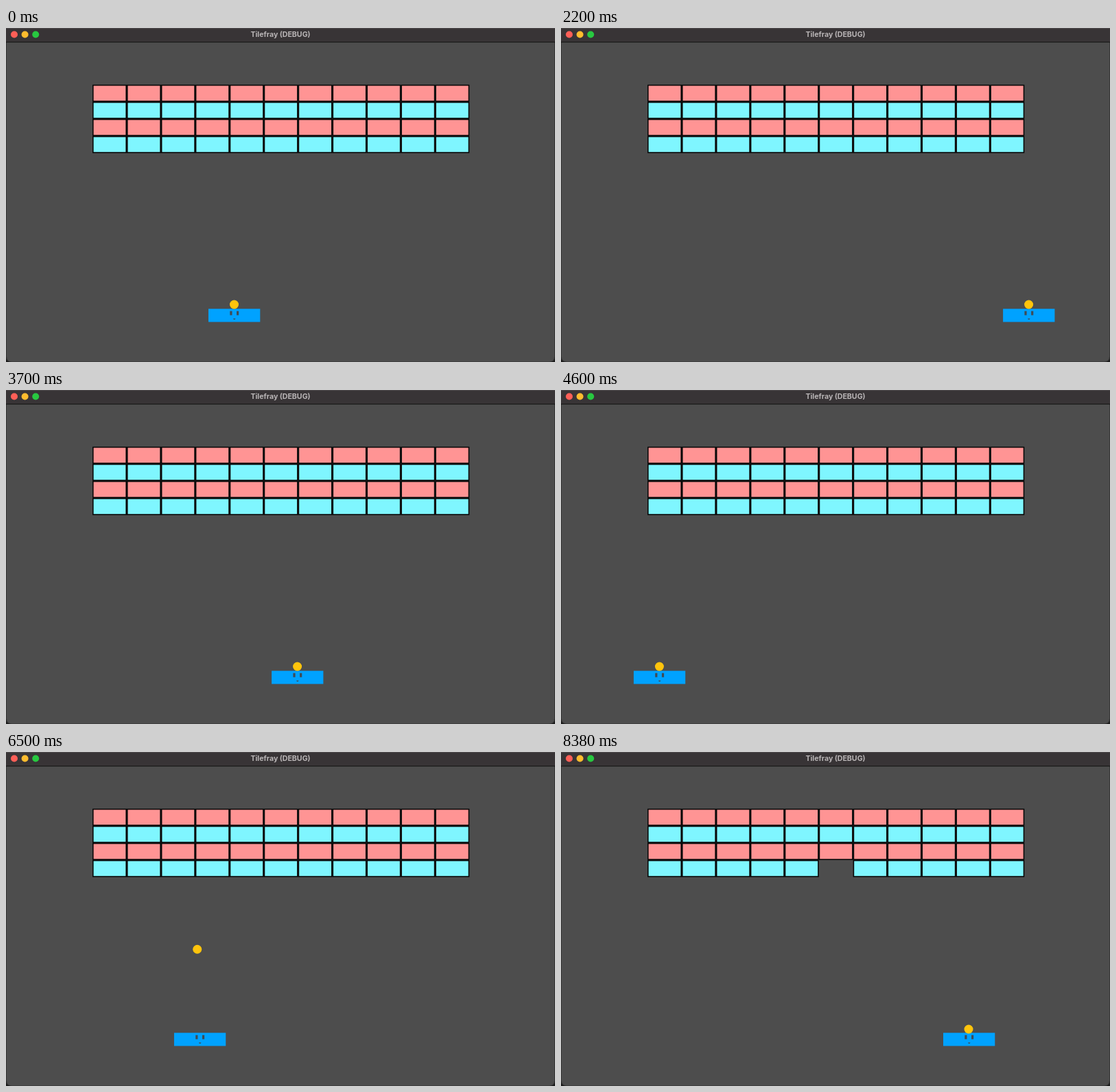
An HTML page for the animation above (8560 ms loop, 800x488 px).

```html
<!DOCTYPE html>
<html lang="en">
<head>
<meta charset="utf-8">
<title>Tilefray</title>
<style>
  html, body { margin: 0; width: 100%; height: 100%; overflow: hidden; background: #1c1c1c; }
  svg { display: block; width: 800px; height: 488px; }
  text { font: 700 10.6px Inter, "Open Sans", sans-serif; fill: #b9b5b6; }
</style>
</head>
<body>
<svg viewBox="0 0 800 488">
  <path d="M0 0H800V480Q800 488 792 488H8Q0 488 0 480Z" fill="#353535"/>
  <path d="M1 21H799V480Q799 487.5 791 487.5H9Q1 487.5 1 480Z" fill="#4d4d4d"/>
  <rect width="800" height="21" fill="#383436"/>
  <rect width="800" height="1" fill="#4c494a"/>
  <rect y="20" width="800" height="1.2" fill="#181818"/>
  <circle cx="12" cy="9.5" r="5" fill="#ff5f57"/>
  <circle cx="27.6" cy="9.5" r="5" fill="#febc2e"/>
  <circle cx="43.2" cy="9.5" r="5" fill="#28c840"/>
  <text x="400" y="13" text-anchor="middle">Tilefray (DEBUG)</text>
  <g id="bricks"></g>
  <g id="paddle">
    <rect x="-37.5" y="410.3" width="75.3" height="19.2" fill="#00a2ff"/>
    <g fill="#3f4b55">
      <rect x="-6.2" y="413.6" width="3.2" height="6"/>
      <rect x="3.5" y="413.6" width="3.2" height="6"/>
      <path d="M-1.5 424.4H2L1.2 426H-.7Z"/>
    </g>
  </g>
  <circle id="ball" r="6.5" fill="#ffc40c"/>
</svg>
<script>
const LOOP = 8560, STEP = 100, LAST_STEP = 8200, FINAL = 8380;
const LAUNCH = 5810, HIT = 7092;
const BALL_SPEED = 0.1677; // px per ms on each axis
const REST_Y = 404, HIT_X = 378, HIT_Y = 189;

// Paddle centre: [time, x], linear in between
const moves = [
  [0, 332.5], [542, 163], [2457, 762], [2620, 762], [4939, 37.5],
  [5315, 37.5], [5717, 163], [6118, 163], [7434, 574.5], [7700, 574.5],
  [7833, 533], [8165, 533], [8362, 594.5], [LOOP, 594.5]
];

const byId = id => document.getElementById(id);
const paddle = byId('paddle'), ball = byId('ball'), bricks = byId('bricks');

function addRect(parent, x, y, width, height, fill) {
  const rect = document.createElementNS('http://www.w3.org/2000/svg', 'rect');
  Object.entries({ x, y, width, height, fill }).forEach(([k, v]) => rect.setAttribute(k, v));
  return parent.appendChild(rect);
}

function addBrick(row, col) {
  const brick = bricks.appendChild(document.createElementNS('http://www.w3.org/2000/svg', 'g'));
  const x = 126 + 49.93 * col, y = 82.8 + 25 * row;
  addRect(brick, x, y, 50, 25, '#080808');
  addRect(brick, x + 1.6, y + 1.6, 46.8, 21.8, row % 2 ? '#7ff6ff' : '#ff9494');
  return brick;
}

let target;
for (let row = 0; row < 4; row++) {
  for (let col = 0; col < 11; col++) {
    const brick = addBrick(row, col);
    if (row === 3 && col === 5) target = brick;
  }
}

function paddleX(t) {
  const i = moves.findIndex(([time]) => time > t);
  const [t0, x0] = moves[i - 1], [t1, x1] = moves[i];
  return x0 + (x1 - x0) * (t - t0) / (t1 - t0);
}

function ballAt(t) {
  if (t < LAUNCH) return [paddleX(t), REST_Y];
  const travel = BALL_SPEED * (t - HIT);
  return [HIT_X + travel, HIT_Y + Math.abs(travel)];
}

function render(time) {
  const t = time >= FINAL ? FINAL : Math.min(Math.floor(time / STEP) * STEP, LAST_STEP);
  const [x, y] = ballAt(t);
  paddle.setAttribute('transform', `translate(${paddleX(t)})`);
  ball.setAttribute('cx', x);
  ball.setAttribute('cy', y);
  target.style.display = t >= HIT ? 'none' : '';
}

const start = performance.now();
function tick() {
  render((performance.now() - start) % LOOP);
  requestAnimationFrame(tick);
}
tick();
</script>
</body>
</html>
```
